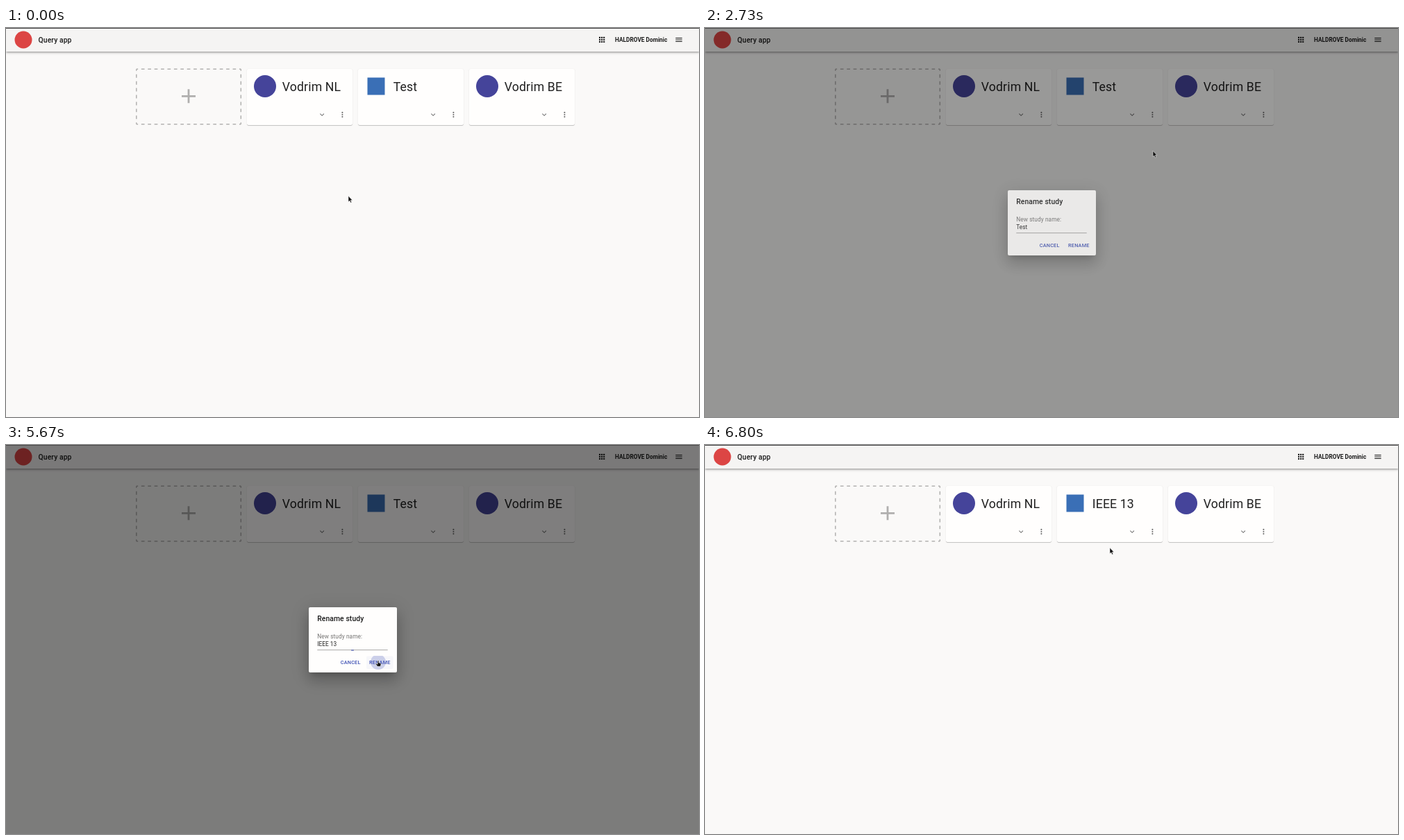
An HTML page for the animation above (7.54 s loop, 998x561 px).

```html
<!DOCTYPE html>
<html lang="en">
<head>
<meta charset="utf-8">
<title>Rename a study</title>
<style>
  html, body { margin: 0; width: 100%; height: 100%; overflow: hidden; background: #faf9f8; }
  #stage { position: relative; width: 998px; height: 561px; overflow: hidden; font-family: Roboto, sans-serif; }
  #stage > *, .dialog > *, svg { position: absolute; }
  svg { left: 0; top: 0; width: 998px; height: 561px; }

  .bar { left: 0; top: 0; width: 998px; height: 34px; background: #f5f4f3;
    box-shadow: 0 1px 2px -.5px #0003, 0 2px 2.6px #00000024, 0 .5px 5.2px #0000001f; }
  .edge { left: 0; top: 0; width: 998px; height: 1px; background: #4a4a4a; }
  .card { top: 59px; width: 152px; height: 80.5px; border-radius: 2px; background: #fffefd;
    box-shadow: 0 1px .5px -.5px #0003, 0 .5px .5px #00000024, 0 .5px 1.6px #0000001f; }

  .h6 { font-size: 10.4px; font-weight: 500; letter-spacing: .0075em; }
  .h4 { font-size: 17.68px; letter-spacing: .00735em; }
  .user { font-size: 8.32px; font-weight: 700; text-anchor: end; }
  .label { font-size: 8.32px; letter-spacing: .0094em; }
  .field { font-size: 8.32px; }
  .button { font-size: 7.28px; font-weight: 500; letter-spacing: .0286em; }
  text { fill: #212121; }
  text.h6, text.user { fill: #1c1c1c; }
  text.label { fill: #757473; }
  text.button { fill: #3f51b5; }

  .dim { left: 0; top: 0; width: 998px; height: 560.5px; background: #00000080; }
  .dialog { left: 0; top: 0; width: 998px; height: 561px; }
  .paper { left: 436px; top: 234px; width: 126.5px; height: 94px; border-radius: 2px; background: #fffefd;
    box-shadow: 0 5.7px 7.8px -3.6px #0003, 0 12.5px 19.8px 1.6px #00000024, 0 4.7px 23.9px 4.2px #0000001f; }
  .typed { left: 448.3px; top: 282.4px; height: 10px; font-size: 8.32px; line-height: 10px;
    color: #212121; white-space: pre; overflow: hidden; }

  /* Every track shares one 7540 ms loop. */
  .dim, .dialog, .typed, .before, .after, .old, .focus, .hover, .ripple, .pointer, .arrow, .hand {
    animation: 7540ms step-end infinite; }
  .dim, .dialog { opacity: 0; animation-name: fade; }
  .before { animation-name: before; }
  .after { animation-name: after; }
  .old { animation-name: old; }
  .typed { animation-name: type; }
  .focus { transform-box: fill-box; transform-origin: center; animation-name: focus; }
  .ripple { transform-box: fill-box; transform-origin: center; animation-name: ripple; }
  .hover, .hand { animation-name: over; }
  .arrow { animation-name: away; }
  .pointer { animation-name: move; }

  @keyframes fade {
    0% { opacity: 0 } 35.345% { opacity: .09 } 36.141% { opacity: .8 }
    37.069% { opacity: .97 } 37.997% { opacity: 1 } 75.928%, 100% { opacity: 0 }
  }
  @keyframes before { 0% { opacity: 1 } 75.928%, 100% { opacity: 0 } }
  @keyframes after { 0% { opacity: 0 } 75.928%, 100% { opacity: 1 } }
  @keyframes old { 0% { opacity: 1 } 56.565%, 100% { opacity: 0 } }
  @keyframes type {
    0% { width: 0 } 63.594% { width: .86em } 64.523% { width: 1.99em } 65.318%, 100% { width: 5em }
  }
  @keyframes focus {
    0% { transform: scaleX(0) }
    46.751% { transform: scaleX(0); animation-timing-function: steps(3) }
    48.607% { transform: none }
    73.276% { transform: none; animation-timing-function: steps(2) }
    75.133% { transform: scaleX(.03) }
    75.928%, 100% { transform: scaleX(0) }
  }
  @keyframes ripple {
    0% { transform: scale(0) }
    73.276% { transform: scale(.3); animation-timing-function: steps(2) }
    75.133% { transform: none }
    75.928%, 100% { transform: scale(0) }
  }
  @keyframes over { 0% { opacity: 0 } 67.971% { opacity: 1 } 75.928%, 100% { opacity: 0 } }
  @keyframes away { 0% { opacity: 1 } 67.971% { opacity: 0 } 75.928%, 100% { opacity: 1 } }
  @keyframes move {
    0% { transform: translate(493px, 242px) }
    9.655% { transform: translate(493px, 242px); animation-timing-function: steps(5) }
    14.098% { transform: translate(591px, 163px); animation-timing-function: steps(6) }
    19.43% { transform: translate(643px, 121px) }
    22.944% { transform: translate(643px, 121px); animation-timing-function: steps(3) }
    25.531% { transform: translate(643px, 150px) }
    26.499% { transform: translate(643px, 150px); animation-timing-function: steps(2) }
    28.183% { transform: translate(645px, 170px) }
    29.151% { transform: translate(645px, 170px); animation-timing-function: steps(2) }
    30.836% { transform: translate(645px, 177px) }
    37.069% { transform: translate(645px, 177px); animation-timing-function: steps(7) }
    43.302% { transform: translate(509px, 280px) }
    44.191% { transform: translate(509px, 280px); animation-timing-function: steps(8) }
    51.26% { transform: translate(468px, 283px) }
    64.456% { transform: translate(468px, 283px); animation-timing-function: steps(4) }
    67.971% { transform: translate(536px, 311px) }
    79.576% { transform: translate(536px, 311px); animation-timing-function: steps(6) }
    84.814%, 100% { transform: translate(583px, 148px) }
  }
</style>
</head>
<body>
<div id="stage">
  <div class="bar"></div>
  <div class="card" style="left:347px"></div>
  <div class="card" style="left:507px"></div>
  <div class="card" style="left:667px"></div>

  <svg viewBox="0 0 998 561">
    <defs>
      <g id="tools" fill="#6b6b6b">
        <path transform="translate(101.9 118.8) scale(.52)" d="M16.6 8.6L12 13.2 7.4 8.6 6 10l6 6 6-6z"/>
        <circle cx="137.4" cy="121.9" r="1.05"/>
        <circle cx="137.4" cy="125" r="1.05"/>
        <circle cx="137.4" cy="128.1" r="1.05"/>
      </g>
      <path id="dots" d="M854 0h2.1v2.1h-2.1zm3.1 0h2.1v2.1h-2.1zm3.1 0h2.1v2.1h-2.1z"/>
    </defs>

    <circle cx="25" cy="17" r="12.5" fill="#dc4544"/>
    <text class="h6" x="46.6" y="20.7">Query app</text>
    <g fill="#1c1c1c">
      <use href="#dots" y="12.8"/><use href="#dots" y="15.9"/><use href="#dots" y="19"/>
      <path d="M964.3 13.9h9.4v1h-9.4zm0 2.6h9.4v1h-9.4zm0 2.6h9.4v1h-9.4z"/>
    </g>
    <text class="user" x="952.3" y="20.2">HALDROVE Dominic</text>

    <!-- Each side starts and ends on half a dash, so the corners are closed. -->
    <g fill="none" stroke="#b3b2b1" stroke-width="1.56">
      <path d="M187.8 59.3h150.5M187.8 138.7h150.5" stroke-dasharray="4.703" stroke-dashoffset="2.352"/>
      <path d="M187.8 59.3v79.4M338.3 59.3v79.4" stroke-dasharray="4.963" stroke-dashoffset="2.481"/>
    </g>
    <path d="M253 98.3h20M263 88.3v20" stroke="#b0afae" stroke-width="2.8"/>

    <circle cx="373" cy="84" r="16" fill="#45449a"/>
    <rect x="520.5" y="71.5" width="25" height="25" fill="#3a6fb6"/>
    <circle cx="693" cy="84" r="16" fill="#45449a"/>
    <g class="h4">
      <text x="397.8" y="90.6">Vodrim NL</text>
      <text class="before" x="557.8" y="90.6">Test</text>
      <text class="after" x="557.8" y="90.6">IEEE 13</text>
      <text x="717.8" y="90.6">Vodrim BE</text>
    </g>
    <use href="#tools" x="347"/><use href="#tools" x="507"/><use href="#tools" x="667"/>
  </svg>

  <div class="dim"></div>
  <div class="edge"></div>

  <div class="dialog">
    <div class="paper"></div>
    <svg viewBox="0 0 998 561">
      <clipPath id="clip"><rect x="519" y="304.3" width="38.6" height="18.8" rx="2"/></clipPath>
      <text class="h6" x="448.2" y="254.2">Rename study</text>
      <text class="label" x="448.2" y="278.5">New study name:</text>
      <text class="field old" x="448.3" y="290.4">Test</text>
      <path d="M448.3 295.6h101.4" stroke="#949392" stroke-width=".8"/>
      <rect class="focus" x="448.3" y="295" width="101.4" height="1.1" fill="#3f51b5"/>
      <g clip-path="url(#clip)">
        <rect class="hover" x="519" y="304" width="39" height="20" fill="#3f51b5" fill-opacity=".04"/>
        <circle class="ripple" cx="536" cy="313" r="11" fill="#3f51b5" fill-opacity=".24"/>
      </g>
      <text class="button" x="481.8" y="316.4">CANCEL</text>
      <text class="button" x="523.1" y="316.4">RENAME</text>
    </svg>
    <div class="typed">IEEE 13</div>
  </div>

  <svg viewBox="0 0 998 561">
    <g class="pointer" fill="#111" stroke="#fff" stroke-width=".5" stroke-linejoin="round">
      <path class="arrow" d="M0 .3v8.4l1.9-1.7 1.3 3 1.5-.6-1.3-3h2.5z"/>
      <path class="hand" d="M-.9.2q.9-1 1.7 0v2.9l2.6.6q.8.3.6 1.4l-.7 3.2h-4.3l-2.5-3.3q0-1 1-.7l1.6 1z"/>
    </g>
  </svg>
</div>
</body>
</html>
```
